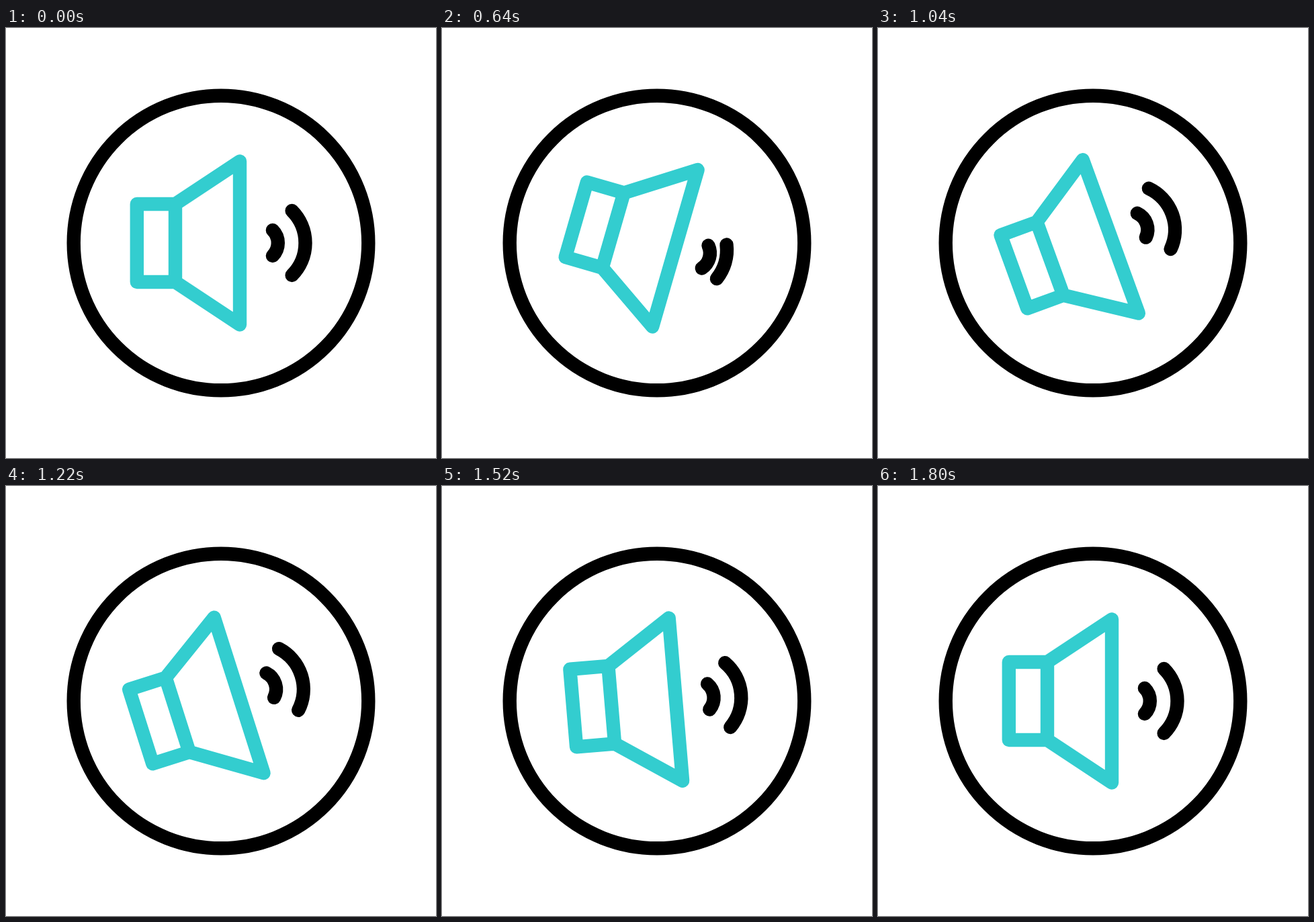
These frames come from a looping animation (640 by 640 pixels, 2120 ms). An HTML page with a canvas:

```html
<!DOCTYPE html>
<html lang="en">
<head>
<meta charset="utf-8">
<title>Speaker</title>
<style>
  html, body { margin: 0; width: 100%; height: 100%; overflow: hidden; background: #fff; }
  canvas { display: block; width: 640px; height: 640px; }
</style>
</head>
<body>
<canvas id="stage" width="640" height="640"></canvas>
<script>
const LOOP = 2120;
const TEAL = '#33cdcf';
const DOT_X = 47; // where both waves shrink to a dot
const ctx = document.getElementById('stage').getContext('2d');

const clamp = v => Math.min(1, Math.max(0, v));
const smooth = u => u * u * (3 - 2 * u);
const ramp = (t, from, to) => smooth(clamp((t - from) / (to - from)));

// Eased progress with flat ends; a and b are the handle positions in time.
function ease(u, a, b) {
  let lo = 0, hi = 1;
  for (let i = 0; i < 30; i++) {
    const m = (lo + hi) / 2, n = 1 - m;
    if (3 * a * m * n * n + 3 * b * m * m * n + m * m * m < u) lo = m;
    else hi = m;
  }
  return smooth((lo + hi) / 2);
}

// start, end, from angle, to angle, handles
const swings = [
  [400, 530, 0, 20, 0.55, 0.58],
  [530, 1040, 20, -20, 0.42, 0.58],
  [1040, 1805, -20, 0, 0.44, 0.5]
];

function tilt(t) {
  for (const [t0, t1, from, to, a, b] of swings) {
    if (t >= t0 && t < t1) return from + (to - from) * ease((t - t0) / (t1 - t0), a, b);
  }
  return 0;
}

// 1 is fully open, 0 is closed
const openness = (t, closeFrom, closeTo, openFrom, openTo) =>
  t < 350 ? 1 - ramp(t, closeFrom, closeTo) : ramp(t, openFrom, openTo);

function wave(apex, radius, shift, open) {
  const x = DOT_X + (apex - DOT_X) * shift;
  const half = Math.max(0.001, Math.PI / 4 * open);
  ctx.beginPath();
  ctx.arc(x - radius, 0, radius, -half, half);
  ctx.stroke();
}

function speaker() {
  ctx.strokeStyle = TEAL;
  ctx.beginPath();
  ctx.rect(-125.2, -58, 57.2, 116);
  ctx.moveTo(-68, -58);
  ctx.lineTo(28, -121.5);
  ctx.lineTo(28, 121.5);
  ctx.lineTo(-68, 58);
  ctx.closePath();
  ctx.stroke();
}

function draw(t) {
  ctx.setTransform(1, 0, 0, 1, 0, 0);
  ctx.fillStyle = '#fff';
  ctx.fillRect(0, 0, 640, 640);
  ctx.translate(320, 320);
  ctx.lineWidth = 20.4;
  ctx.lineCap = ctx.lineJoin = 'round';
  ctx.strokeStyle = '#000';

  ctx.beginPath();
  ctx.arc(0, 0, 219.3, 0, Math.PI * 2);
  ctx.stroke();

  ctx.rotate(tilt(t) * Math.PI / 180);
  const inner = openness(t, 50, 300, 400, 700);
  wave(84.8, 27, inner, inner);
  wave(125.5, 67.9, openness(t, 0, 300, 400, 760), openness(t, 0, 200, 520, 760));
  speaker();
}

const start = performance.now();
function tick() {
  draw((performance.now() - start) % LOOP);
  requestAnimationFrame(tick);
}
draw(0);
requestAnimationFrame(tick);
</script>
</body>
</html>
```
